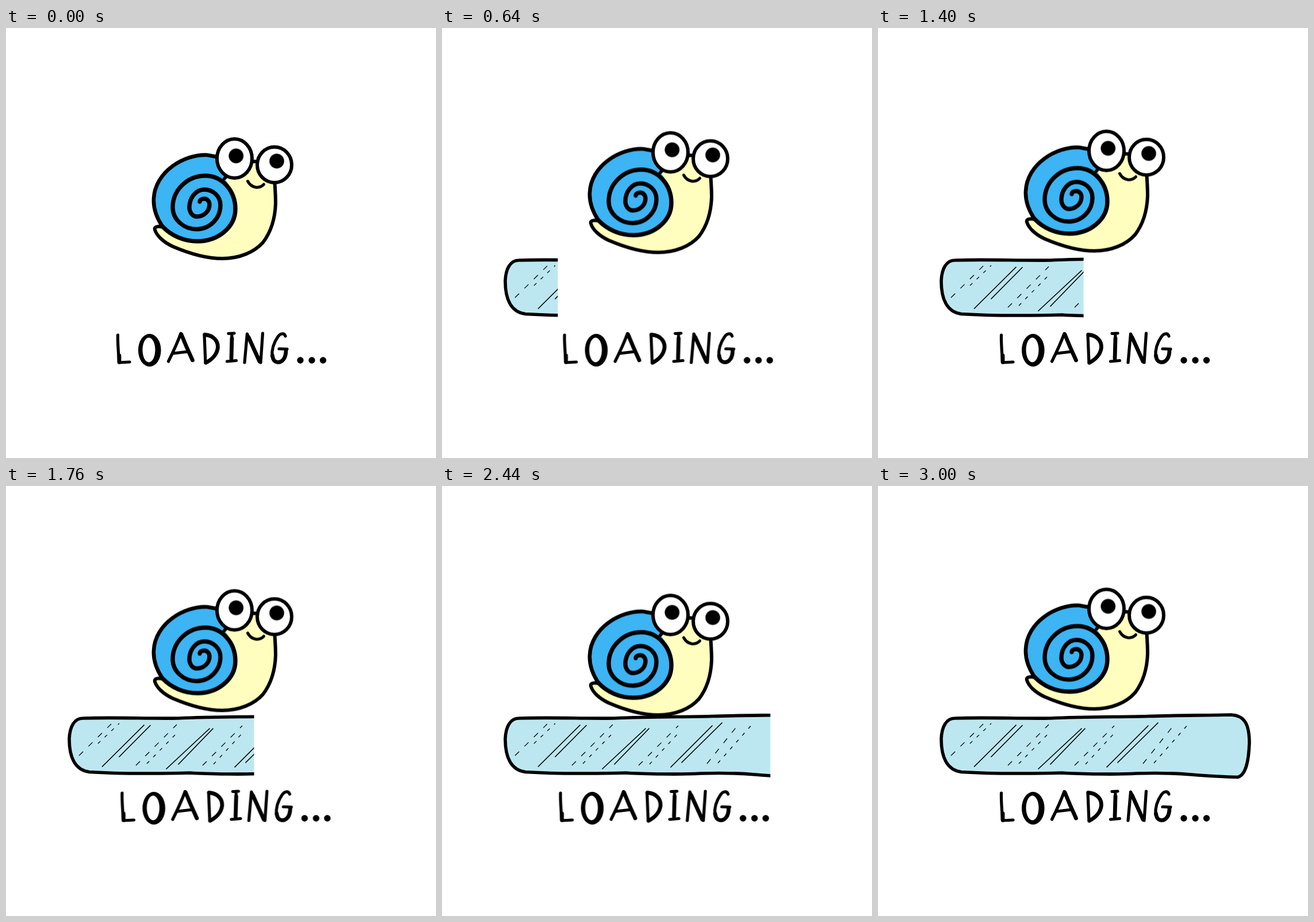
Animation of 748x748 px, one loop 3040 ms. Source, as an HTML page without scripts:

```html
<!DOCTYPE html>
<html lang="en">
<head>
<meta charset="utf-8">
<title>Loading</title>
<style>
  html, body { margin: 0; width: 100%; height: 100%; overflow: hidden; background: #fff; }
  svg { display: block; width: 100vw; height: 100vh; }
  .line { fill: none; stroke: #000; stroke-linecap: round; stroke-linejoin: round; }
  .dash { fill: none; stroke: #000; stroke-width: 1.3; }

  .snail, .word, .cover { animation: 3040ms -2ms infinite; }
  .snail { animation-name: bob; animation-timing-function: steps(10); }
  .word { animation-name: sway; animation-timing-function: steps(10); }
  .cover { animation-name: reveal; animation-timing-function: steps(76); }

  @keyframes bob {
    0%, 26.316%, 52.632%, 78.947% { transform: translateY(0); }
    13.158%, 39.474%, 65.789% { transform: translateY(-26.6px); }
    92.105% { transform: translateY(-26.6px); animation-timing-function: steps(6); }
    100% { transform: translateY(-10.6px); }
  }
  @keyframes sway {
    0%, 6.579% { transform: translateX(0); }
    19.737%, 46.053%, 72.368% { transform: translateX(20px); }
    32.895%, 59.211%, 85.526% { transform: translateX(6px); }
    98.684% { transform: translateX(20px); animation-timing-function: steps(1); }
    100% { transform: translateX(18.6px); }
  }
  @keyframes reveal {
    from { transform: translateX(70px); }
    to { transform: translateX(694.5px); }
  }
</style>
</head>
<body>
<svg viewBox="0 0 748 748" role="img" aria-label="Loading...">
  <defs>
    <radialGradient id="pupil">
      <stop offset=".88"/>
      <stop offset="1" stop-opacity=".15"/>
    </radialGradient>
  </defs>

  <g class="bar">
    <path class="line" style="fill:#bde7f0" stroke-width="5.6"
      d="M134 404 C190 402 250 405 300 404 C360 401 420 402 470 400.500 C520 399 570 399 614 398
         C636 399 646 412 646 447 C645 475 641 502 626 506.500 C600 506 570 504 545 502
         C510 499 480 499 450 500 C420 502 350 501 320 499 C280 500 200 501 145 497.500
         C119 494 110 470 110 440 C111 418 119 404 134 404 Z"/>
    <path class="line" stroke-width="1.7"
      d="M167.500 488 L240 416 M197 471 L251 416.500
         M279 492 L354 422 M300 484 L360 422
         M398 489 L470 417 M417 481 L487 412"/>
    <path class="dash" stroke-dasharray="10 13"
      d="M127 469 L183 414 M226 486 L297 415 M342 486 L411 417 M461 483 L513 418"/>
    <path class="dash" stroke-dasharray="6 10"
      d="M160 448 L197 413 M245 483 L297 430 M361 484 L411 430 M480 482 L540 414"/>
  </g>
  <rect class="cover" y="385" width="748" height="135" fill="#fff"/>

  <g class="snail">
    <path class="line" style="fill:#fffebe" stroke-width="6"
      d="M274 347 C266 344 257 345 259 351 C262 361 273 372 290 380 C318 392 350 401 376 401
         C406 401 432 390 447 373 C460 356 468 335 469 305 C469 290 468 278 467 262
         C464 245 450 233 432 232 C415 232 395 240 380 262 Z"/>
    <path fill="#3db4f3"
      d="M372 225 L350 221 C310 219 259 250 257 297 C256 315 262 330 272 345
         C288 362 310 371 333 371 A66 56 0 0 0 399 315 C399 292 390 274 380 262 L390 245 Z"/>
    <path class="line" stroke-width="7.4"
      d="M337 302 A8 5 0 0 1 345 297 A9 10 0 0 1 354 307 A22 21 0 0 1 332 328
         A13 16 0 0 1 319 312 A26 31 0 0 1 345 281 A28 27 0 0 1 373 308
         A41 42 0 0 1 332 350 A42 38 0 0 1 290 312 A57 55 0 0 1 347 257
         A52 58 0 0 1 399 315 A66 56 0 0 1 333 371 C310 371 288 362 272 345"/>
    <path class="line" stroke-width="6.6"
      d="M272 345 C262 330 256 315 257 297 C259 250 310 219 350 221 L372 225"/>
    <path class="line" stroke-width="5" d="M379 263 L386 253"/>
    <g class="line" style="fill:#fff" stroke-width="6">
      <ellipse cx="397.500" cy="227" rx="30.500" ry="34"/>
      <ellipse cx="467" cy="238" rx="30" ry="31"/>
    </g>
    <g fill="url(#pupil)">
      <circle cx="400.300" cy="222.500" r="13.500"/>
      <circle cx="471" cy="231.500" r="13.500"/>
    </g>
    <path class="line" stroke-width="5" d="M420.500 266.500 C427 279 441 280 448.500 272"/>
  </g>

  <g class="word">
    <g class="line" stroke-width="5.200">
      <path d="M194.500 534 C194 550 196 566 196.500 582 L215 581"/>
      <path d="M304 531.500 C298 548 290 565 282.500 580 M291 566 L316 563"/>
      <path d="M345 533 L347 583"/>
      <path d="M387 531.500 L397 531 M393 532 L391.500 579 M384.500 580 L400.500 578.500"/>
      <path d="M415 582 L419.500 532 L441.500 581 M446.500 531 L443 582"/>
      <path d="M486 536 C484 530 477 531 473 537 C466 547 462 560 463 572 M475 558 L489 558.500"/>
    </g>
    <g class="line" stroke-width="6.800">
      <path d="M197 570 L197 581"/>
      <path d="M305 533 C311 548 318 564 324.500 578"/>
      <path d="M346 533.500 C362 535 369 545 368.500 556 C367 568 358 577 348 582"/>
      <path d="M393 540 L392 575"/>
      <path d="M422 538 L441 580"/>
      <path d="M463.500 570 C465 584 477 584 483 576 C486 572 487 566 487 560"/>
    </g>
    <path fill-rule="evenodd"
      d="M230 560.500 a19.800 28.500 0 1 1 39.600 0 a19.800 28.500 0 1 1 -39.600 0 Z
         M237.500 560 a11 21.500 0 1 0 22 0 a11 21.500 0 1 0 -22 0 Z"/>
    <circle cx="512" cy="578" r="5.700"/>
    <circle cx="532" cy="578" r="5.700"/>
    <circle cx="551.500" cy="578" r="5.700"/>
  </g>
</svg>
</body>
</html>
```
